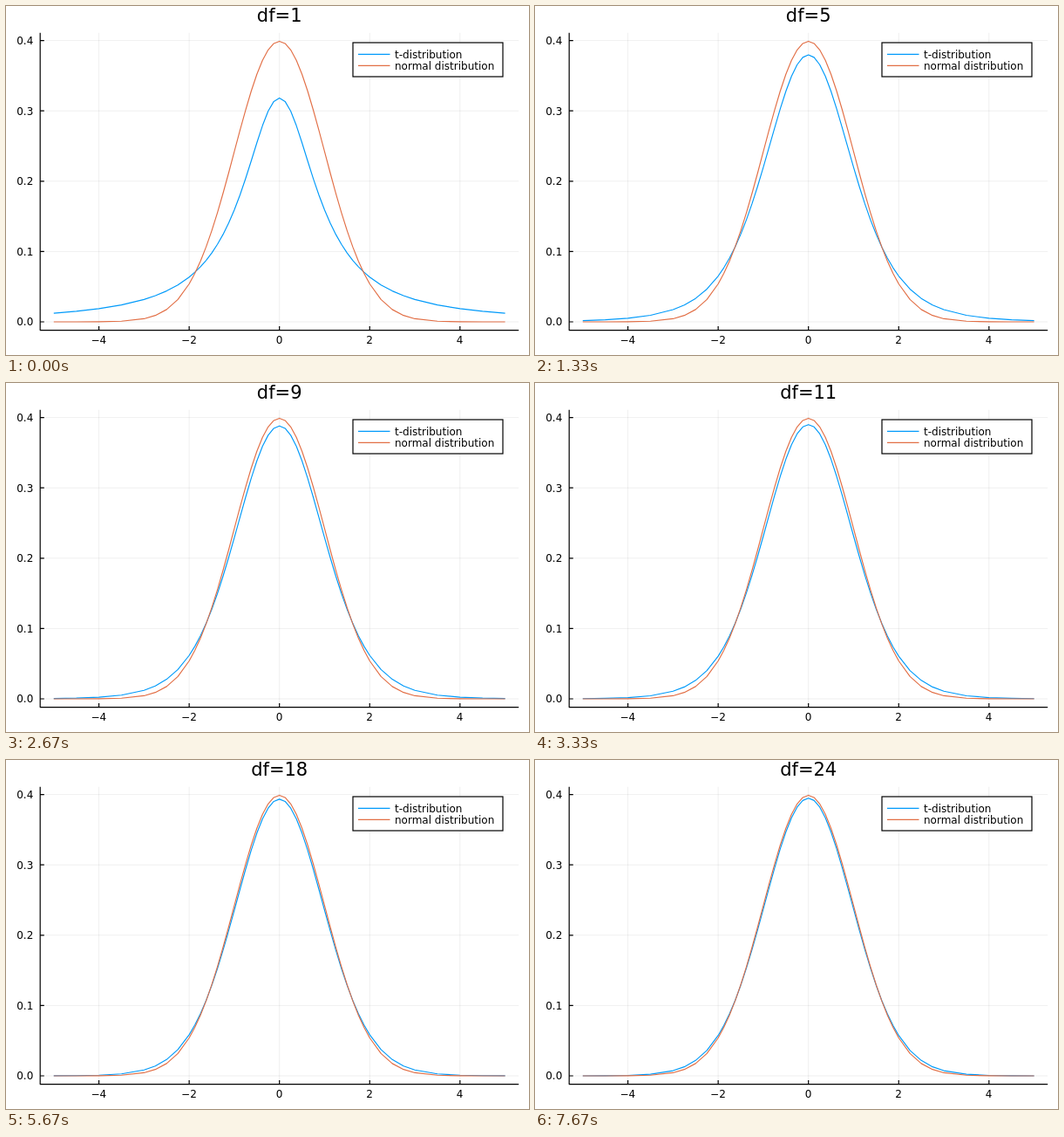
Animation, 600 px wide and 400 px high, one loop 8 s. Source, as an HTML page:

```html
<!DOCTYPE html>
<html lang="en">
<head>
<meta charset="utf-8">
<title>t-distribution and normal distribution</title>
<style>
  html, body { margin: 0; width: 100%; height: 100%; overflow: hidden; background: #fff; }
  svg { display: block; width: 600px; height: 400px; }
  text { font: 12px "DejaVu Sans", sans-serif; fill: #000; }
  #title { font-size: 21px; text-anchor: middle; }
  path { fill: none; stroke-linejoin: round; }
  .grid { stroke: #000; stroke-opacity: .1; stroke-width: .65; }
  .axis { stroke: #000; stroke-width: 1.2; }
  .t { stroke: #009afa; stroke-width: 1.15; }
  .normal { stroke: #e26f46; stroke-width: 1.15; }
  .box { fill: #fff; stroke: #000; stroke-width: 1.2; }
  .xl { text-anchor: middle; }
  .yl { text-anchor: end; }
</style>
</head>
<body>
<svg viewBox="0 0 600 400">
  <path class="grid" id="grid"/>
  <path class="axis" id="axis"/>
  <g id="labels"></g>
  <path class="t" id="t"/>
  <path class="normal" id="normal"/>
  <rect class="box" x="398" y="42" width="172" height="39"/>
  <path class="t" d="M404 55.3H440.5"/>
  <path class="normal" d="M404 68.4H440.5"/>
  <text x="446" y="59.5">t-distribution</text>
  <text x="446" y="73">normal distribution</text>
  <text id="title" x="313.7" y="18"></text>
</svg>
<script>
const $ = id => document.getElementById(id);
const LOOP = 8000, STEPS = 24;
const L = 39.2, R = 588.2, T = 30.8, B = 371.6;
const px = x => 313.7 + 51.78 * x;
const py = y => 362 - 806 * y;

// Sample positions: coarse in the tails, finer near the centre
const xs = [];
for (let x = -5; x <= 5;) {
  xs.push(x);
  const mid = Math.abs(x + 0.01);
  x += mid > 3 ? 0.5 : mid > 2 ? 0.25 : 0.125;
}

const curve = f => 'M' + xs.map(x => px(x).toFixed(2) + ' ' + py(f(x)).toFixed(2)).join('L');

const normalPdf = x => Math.exp(-x * x / 2) / Math.sqrt(2 * Math.PI);

function tPdf(df) {
  // Ratio of gamma functions, built up by recurrence
  let g = 1 / Math.sqrt(Math.PI);
  for (let v = 1; v < df; v++) g = v / (2 * g);
  const c = g / Math.sqrt(df * Math.PI);
  return x => c * Math.pow(1 + x * x / df, -(df + 1) / 2);
}

function drawAxes() {
  let grid = '', axis = `M${L} ${T}V${B}H${R}`, labels = '';
  for (let x = -4; x <= 4; x += 2) {
    const p = px(x);
    grid += `M${p} ${T}V${B}`;
    axis += `M${p} ${B}v-4.6`;
    labels += `<text class="xl" x="${p - 0.2}" y="387">${String(x).replace('-', '\u2212')}</text>`;
  }
  for (let i = 0; i <= 4; i++) {
    const p = py(i / 10);
    grid += `M${L} ${p}H${R}`;
    axis += `M${L} ${p}h4.6`;
    labels += `<text class="yl" x="31.3" y="${p + 4.4}">${(i / 10).toFixed(1)}</text>`;
  }
  $('grid').setAttribute('d', grid);
  $('axis').setAttribute('d', axis);
  $('labels').innerHTML = labels;
  $('normal').setAttribute('d', curve(normalPdf));
}

const startOf = i => Math.round(i * 100 / 3) * 10;
let shown = 0;

function draw() {
  const time = performance.now() % LOOP;
  let df = 1;
  while (df < STEPS && startOf(df) <= time) df++;
  if (df !== shown) {
    shown = df;
    $('title').textContent = 'df=' + df;
    $('t').setAttribute('d', curve(tPdf(df)));
  }
  requestAnimationFrame(draw);
}

drawAxes();
draw();
</script>
</body>
</html>
```
